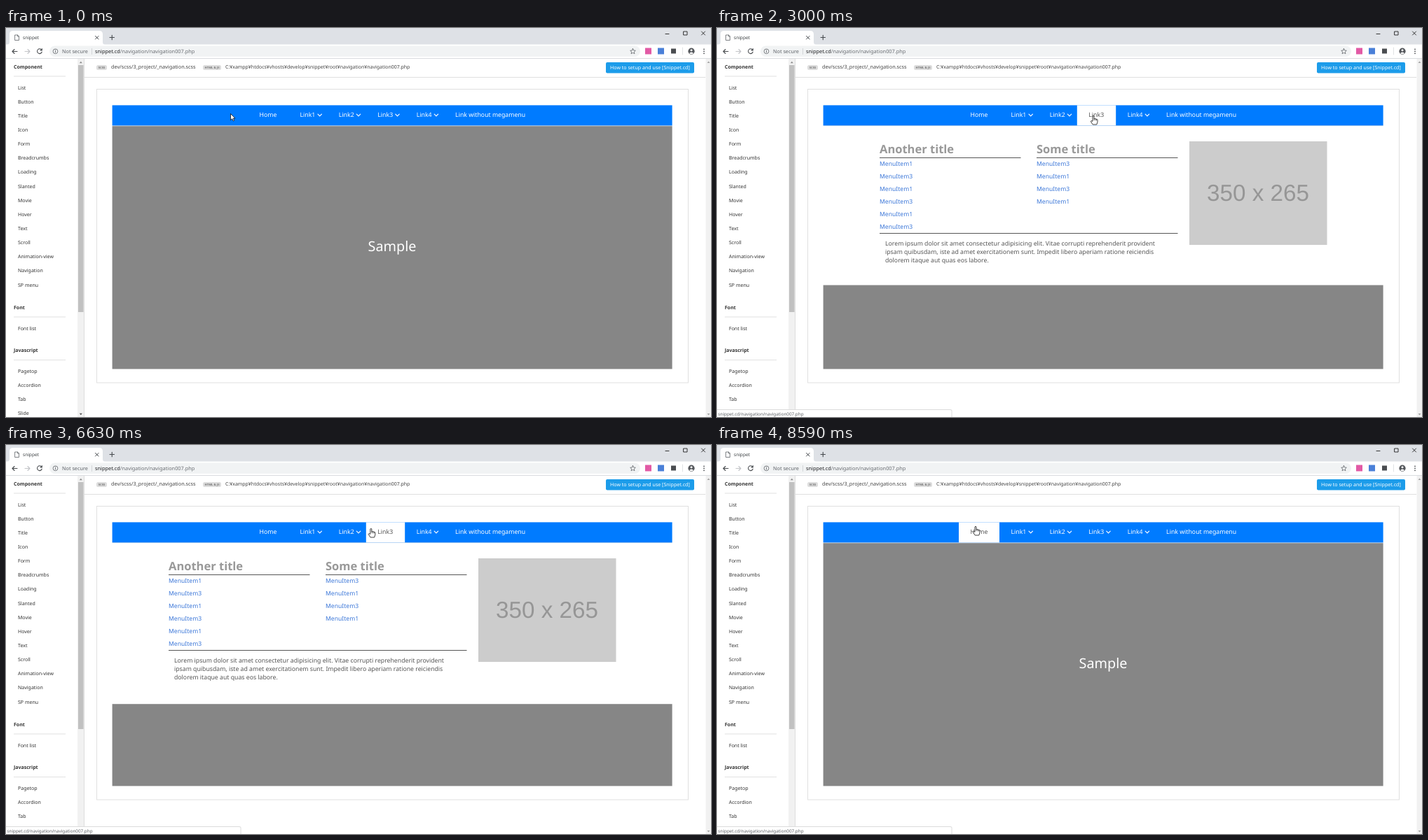
Write an HTML page that moves like this. It is 1006 px wide and 556 px high and loops after 9200 ms.

```html
<!DOCTYPE html>
<html lang="en">
<head>
<meta charset="utf-8">
<title>snippet</title>
<style>
  html, body { margin: 0; width: 100%; height: 100%; overflow: hidden; background: #fff; }
  svg { display: block; width: 1006px; height: 556px; }
  text { font-family: "Noto Sans", "Open Sans", sans-serif; white-space: pre; text-rendering: geometricPrecision; }
  .line { fill: none; stroke-linecap: round; stroke-linejoin: round; }
</style>
</head>
<body>
<svg id="stage" viewBox="0 0 1006 556" xmlns="http://www.w3.org/2000/svg"></svg>
<script>
const NS = 'http://www.w3.org/2000/svg';
const stage = document.getElementById('stage');

function add(parent, tag, attrs, content) {
  const el = document.createElementNS(NS, tag);
  for (const key in attrs) el.setAttribute(key, attrs[key]);
  if (content !== undefined) el.textContent = content;
  parent.appendChild(el);
  return el;
}
const rect = (p, x, y, width, height, fill, more) =>
  add(p, 'rect', { x, y, width, height, fill, ...more });
const text = (p, x, y, size, fill, content, more) =>
  add(p, 'text', { x, y, 'font-size': size, fill, ...more }, content);
const line = (p, d, stroke, width = 1) =>
  add(p, 'path', { d, stroke, 'stroke-width': width, class: 'line' });
const shape = (p, d, fill) => add(p, 'path', { d, fill });
const bold = { 'font-weight': 700 };

const LEFT = 151.6, WIDTH = 799, NAV_TOP = 110.4, NAV_END = 139.4;

function drawBrowser() {
  rect(stage, 0, 0, 1006, 24, '#dee1e6');
  shape(stage, 'M1 24Q5 24 5 20V9Q5 4 10 4H133Q138 4 138 9V20Q138 24 142 24Z', '#fff');
  line(stage, 'M13 10h3.500l2 2v5.500h-5.500zM16.500 10v2h2', '#5f6368', .8);
  text(stage, 24, 16, 6.55, '#3c4043', 'snippet');
  line(stage, 'M127.500 11.500l4.500 4.500m0-4.500l-4.500 4.500', '#45494d', 1);
  line(stage, 'M148 13.500h6.500M151.250 10.250v6.500', '#45494d', 1.1);
  line(stage, 'M941 8.500h5', '#222', .9);
  line(stage, 'M967 5h5v5h-5zM992.500 5l5 5m0-5l-5 5', '#222', .9);

  rect(stage, 0, 23.500, 1006, 19.500, '#fff');
  line(stage, 'M16 33.500h-7m3-3l-3 3l3 3', '#4a4d51', 1.1);
  line(stage, 'M27 33.500h7m-3-3l3 3l-3 3', '#c3c5c8', 1.1);
  line(stage, 'M50.600 31a3.400 3.400 0 1 0 .6 3.300M51.300 29.600v2.300h-2.300', '#4a4d51', 1.1);
  rect(stage, 62, 25.500, 843, 15.500, '#f1f3f4', { rx: 7.75 });
  add(stage, 'circle', { cx: 70.5, cy: 33.3, r: 3.4, fill: 'none', stroke: '#5f6368', 'stroke-width': .8 });
  line(stage, 'M70.500 33v1.800M70.500 31.500v.1', '#5f6368', .9);
  text(stage, 80, 36, 7.25, '#5f6368', 'Not secure');
  line(stage, 'M122.500 29.500v8', '#c4c7ca', .7);
  text(stage, 127, 36, 7.35, '#6a6e73', '')
    .innerHTML = '<tspan fill="#202124">snippet.cd</tspan>/navigation/navigation007.php';
  line(stage, 'M894.500 29.500l1.100 2.500l2.700.3l-2 1.800l.6 2.700l-2.400-1.400l-2.400 1.400l.6-2.700l-2-1.800l2.700-.3z', '#5f6368', .8);
  rect(stage, 912, 28.500, 9, 9, '#e25aa5');
  rect(stage, 930, 28.500, 9, 9, '#4a80d8');
  rect(stage, 949, 29.500, 7, 7, '#4a4d51');
  line(stage, 'M965.500 28v10', '#d5d7da', .7);
  add(stage, 'circle', { cx: 978, cy: 33.2, r: 4.6, fill: '#55585c' });
  add(stage, 'circle', { cx: 978, cy: 31.8, r: 1.5, fill: '#fff' });
  shape(stage, 'M975 36q3-3 6 0q-3 2.400-6 0z', '#fff');
  for (const cy of [30.3, 33.3, 36.3]) add(stage, 'circle', { cx: 996, cy, r: .9, fill: '#4a4d51' });
  rect(stage, 0, 43, 1006, 1, '#dadce0');
}

function drawSidebar() {
  const groups = [
    [55, 'Component', ['List', 'Button', 'Title', 'Icon', 'Form', 'Breadcrumbs', 'Loading', 'Slanted', 'Movie',
      'Hover', 'Text', 'Scroll', 'Animation-view', 'Navigation', 'SP menu']],
    [399, 'Font', ['Font list']],
    [460.5, 'Javascript', ['Pagetop', 'Accordion', 'Tab', 'Slide']]
  ];
  for (const [y, name, items] of groups) {
    text(stage, 11, y + 2.6, 7, '#333', name, bold);
    rect(stage, 11, y + 13.5, 74, 1, '#e2e2e2');
    items.forEach((item, i) => text(stage, 17, y + 32.5 + i * 20.15, 7, '#333', item));
  }
  rect(stage, 102, 44, 9.5, 512, '#f1f1f1');
  rect(stage, 103, 53, 7.5, 353, '#c1c1c1');
  shape(stage, 'M104.800 50.200h4l-2-2.400z', '#8a8a8a');
  shape(stage, 'M104.800 550.800h4l-2 2.400z', '#505050');
  rect(stage, 111, 44, 1, 512, '#dcdcdc');
}

function drawPage() {
  rect(stage, 998.5, 44, 7.5, 512, '#f1f1f1');
  shape(stage, 'M1000.500 50h4l-2-2.400z', '#a3a3a3');
  shape(stage, 'M1000.500 551h4l-2 2.400z', '#a3a3a3');
  rect(stage, 112, 70, 886, 1, '#dfdfdf');
  rect(stage, 129, 53, 15, 7, '#ddd', { rx: 2.5 });
  text(stage, 136.5, 58.1, 4.2, '#777', 'SCSS', { ...bold, 'text-anchor': 'middle' });
  text(stage, 150, 58, 7.28, '#444', 'dev/scss/3_project/_navigation.scss');
  rect(stage, 281, 53, 26, 7, '#ddd', { rx: 2.5 });
  text(stage, 294, 58.1, 4.2, '#777', 'HTML & JS', { ...bold, 'text-anchor': 'middle' });
  text(stage, 313, 58, 6.96, '#444', 'C:¥xampp¥htdocs¥vhosts¥develop¥snippet¥root¥navigation¥navigation007.php');
  rect(stage, 856, 49, 126, 15.5, '#1c9cea', { rx: 2 });
  text(stage, 862, 59.4, 7.08, '#fff', 'How to setup and use [Snippet.cd]');
  rect(stage, 129.5, 87.5, 844, 419.5, '#fff', { stroke: '#e0e0e0' });
  rect(stage, LEFT, NAV_END, WIDTH, 348, '#868686');
  text(stage, 551, 319, 19.8, '#fff', 'Sample', { 'text-anchor': 'middle' });
}

const lorem = [
  'Lorem ipsum dolor sit amet consectetur adipisicing elit. Vitae corrupti reprehenderit provident',
  'ipsam quibusdam, iste ad amet exercitationem sunt. Impedit libero aperiam ratione reiciendis',
  'dolorem itaque aut quas eos labore.'
];

// height: how far the menu's white panel opens
function drawMenu(titles, left, right, height, note) {
  const g = add(stage, 'g', { opacity: 0 });
  [[232, titles[0], left], [456, titles[1], right]].forEach(([x, title, nums]) => {
    text(g, x, 178.5, 16.5, '#999', title, bold);
    rect(g, x, 185, 201.5, 1, '#555');
    [...nums].forEach((n, i) => text(g, x, 197 + i * 17.95, 8.6, '#3a76d8', 'MenuItem' + n));
  });
  if (note.length) rect(g, 232, 293, 425.5, 1, '#555');
  note.forEach((row, i) => text(g, 240, 311 + i * 12.2, 8.71, '#555', row));
  rect(g, 674, 162, 196.5, 148, '#ccc');
  text(g, 772, 247, 33.2, '#969696', '350 x 265',
    { 'text-anchor': 'middle', style: 'font-family:"Liberation Sans",Arial,sans-serif' });
  return { g, height };
}

function drawNav() {
  const labels = ['Home', 'Link1', 'Link2', 'Link3', 'Link4', 'Link without megamenu'];
  const edges = [345, 403, 458.3, 513.8, 569.2, 624.6, 757];
  const height = NAV_END - NAV_TOP;
  rect(stage, LEFT, NAV_TOP, WIDTH, height, '#007bff');
  return labels.map((label, i) => {
    const x = edges[i];
    const back = rect(stage, x, NAV_TOP, edges[i + 1] - x, height, '#fff', { opacity: 0 });
    const name = text(stage, x + 16.5, 127.2, 8.72, '#fff', label);
    if (i > 0 && i < 5) line(stage, `M${x + 42} 123.200l2.700 2.700l2.700-2.700`, '#fff', 1.2);
    return { back, name };
  });
}

drawBrowser();
drawSidebar();
drawPage();
const panel = rect(stage, LEFT - .6, NAV_END, WIDTH + 1.2, 1, '#fff');
const some = ['Some title', 'Another title'];
const menus = [
  drawMenu(some, '111111', '1111', 230, lorem),
  drawMenu(some, '222222', '2222', 203, []),
  drawMenu([some[1], some[0]], '131313', '3131', 230, lorem),
  drawMenu(some, '444444', '4444', 230, lorem)
];
const nav = drawNav();

const status = add(stage, 'g', { opacity: 0 });
shape(status, 'M0 556V545H333Q335.500 545 335.500 547.500V556Z', '#dcdcdc');
shape(status, 'M0 556V546H333Q334.500 546 334.500 547.500V556Z', '#fff');
text(status, 1.5, 553.6, 6.3, '#5f6368', 'snippet.cd/navigation/navigation007.php');

const arrow = add(stage, 'path', { d: 'M0 0V9.200L2.200 7.200L3.700 10.400L5.200 9.700L3.700 6.600H6.500Z',
  fill: '#fff', stroke: '#111', 'stroke-width': .8 });
const hand = add(stage, 'g', {});
add(hand, 'path', { d: 'M-1 1Q0-.6 1 1V4.700Q2 4 2.800 5Q3.900 4.300 4.500 5.400Q5.900 5 6 6.400V9.200L4.800 13H-.8L-3.700 8.600Q-3.800 6.800-1 8.300Z',
  fill: '#fff', stroke: '#111', 'stroke-width': .8, 'stroke-linejoin': 'round' });
line(hand, 'M1 4.700v2M2.800 5v1.900M4.500 5.400v1.700', '#111', .6);

const LOOP = 9200, FADE = 300, OPEN = 400, CLOSE = 420;
// [time, hovered item]
const hovers = [[470, 0], [1246, 1], [1990, 2], [2692, 3], [3430, 4], [4192, 5],
  [5560, 4], [6110, 3], [6680, 2], [7290, 1], [7855, 0]];
const spans = hovers.map(([start, item], i) => ({ item, start, end: (hovers[i + 1] || [Infinity])[0] }));
// [time, x, y] of the pointer tip
const path = [[420, 320.5, 122.5], [470, 345, 120], [680, 372, 118], [1100, 372, 118], [1246, 403, 118],
  [1380, 425.5, 118.5], [1500, 433, 119], [1800, 433, 119], [1990, 458, 121], [2200, 488, 123], [2580, 491, 123],
  [2692, 514, 124], [2900, 537, 125], [3270, 537, 125], [3430, 569, 123], [3680, 598, 121], [4040, 598, 121],
  [4192, 625, 118], [4400, 673, 116], [5290, 673, 116], [5560, 624, 118], [6110, 569, 118], [6370, 535, 119],
  [6530, 535, 119], [6630, 521, 119], [6680, 513, 119], [6880, 486, 119], [7150, 486, 119],
  [7290, 458, 118], [7855, 403, 117], [8030, 369, 116]];

const clamp = v => Math.min(1, Math.max(0, v));
const fastOut = v => 1 - (1 - clamp(v)) ** 3;
const fall = v => (1 - clamp(v) ** 1.3) ** 2.5;

const hoverLevel = (item, t) => clamp(spans.reduce((sum, s) => s.item !== item ? sum :
  sum + clamp((t - s.start) / FADE) - clamp((t - s.end) / FADE), 0));

// Each menu opens at once, but shrinks only after its content has faded.
const panelHeight = t => Math.max(0, ...spans.map(({ item, start, end }) => {
  const menu = menus[item - 1];
  return menu ? menu.height * fastOut((t - start) / OPEN) * fall((t - end - FADE) / CLOSE) : 0;
}));

function pointer(t) {
  const i = path.findIndex(key => key[0] > t);
  if (i === 0) return path[0].slice(1);
  if (i < 0) return path[path.length - 1].slice(1);
  const [a, b] = [path[i - 1], path[i]];
  const k = (t - a[0]) / (b[0] - a[0]);
  return [1, 2].map(n => a[n] + (b[n] - a[n]) * k);
}

function render(t) {
  nav.forEach(({ back, name }, i) => {
    const level = hoverLevel(i, t);
    const tone = Math.round(255 - 170 * level);
    back.setAttribute('opacity', level);
    name.setAttribute('fill', `rgb(${tone},${tone},${tone})`);
    if (menus[i - 1]) menus[i - 1].g.setAttribute('opacity', level);
  });
  panel.setAttribute('height', .8 + panelHeight(t));
  status.setAttribute('opacity', clamp((t - 870) / 100));
  const [x, y] = pointer(t);
  const onLink = t >= hovers[0][0];
  arrow.setAttribute('visibility', onLink ? 'hidden' : 'visible');
  hand.setAttribute('visibility', onLink ? 'visible' : 'hidden');
  (onLink ? hand : arrow).setAttribute('transform', `translate(${x} ${y})`);
}

const begin = performance.now();
function tick() {
  render((performance.now() - begin) % LOOP);
  requestAnimationFrame(tick);
}
tick();
</script>
</body>
</html>
```
